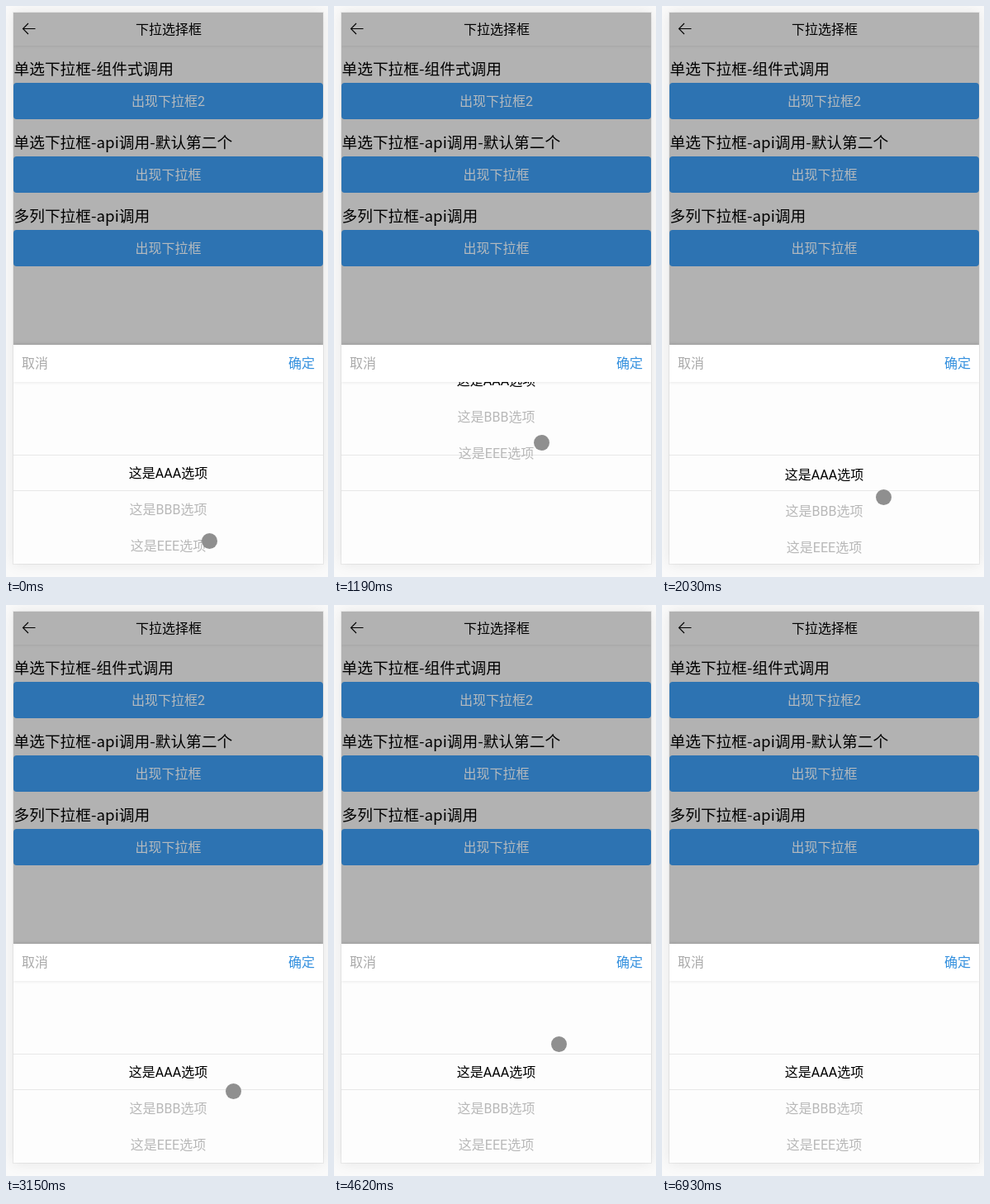
An HTML page that plays this animation: 390x691 px, repeating every 7.35 s.

```html
<!DOCTYPE html>
<html lang="zh-CN">
<head>
<meta charset="utf-8">
<title>下拉选择框</title>
<style>
html, body { margin: 0; width: 100%; height: 100%; overflow: hidden; }
body { position: relative; background: #fafafa; font: 16px Roboto, "Noto Sans CJK SC", "Noto Sans CJK", sans-serif; }
.stage { position: absolute; left: 0; top: 0; width: 390px; height: 691px; overflow: hidden; white-space: nowrap; }
.stage * { position: absolute; box-sizing: border-box; }
.phone { left: 9px; top: 8px; width: 375px; height: 667px; overflow: hidden; background: #b2b2b2;
  box-shadow: 0 0 0 1px rgba(0,0,0,.06), 0 0 16px rgba(0,0,0,.09); }
.bar { left: 0; top: 0; width: 375px; height: 40px; line-height: 42px; color: #000;
  box-shadow: 0 1px 3px rgba(0,0,0,.08); }
.bar svg { left: 10px; top: 12px; }
.bar span { left: 148px; }
h3 { left: .5px; margin: 0; color: #000;
  font: 400 18.72px/34px "Noto Sans CJK SC", "Noto Sans CJK", sans-serif; }
.btn { left: 0; width: 375px; height: 44px; line-height: 46px; border-radius: 4px;
  text-align: center; background: #2d73b2; color: #b5babe; }
.sheet { left: 0; top: 402px; width: 375px; height: 265px; background: #fff; box-shadow: 0 -1px 4px rgba(0,0,0,.13); }
.tools { left: 0; top: 0; width: 375px; height: 45px; line-height: 45px; z-index: 1; background: #fff;
  box-shadow: 0 1px 3px rgba(0,0,0,.08); }
.cancel { left: 10px; color: #aaa; }
.ok { right: 10px; color: #3490de; }
.wheel { left: 0; top: 45px; width: 375px; height: 220px; overflow: hidden; background: #fdfdfd; }
.mark { left: 0; top: 88px; width: 375px; height: 44px; border: solid #e8e8e8; border-width: 1px 0; }
.list { left: 0; top: 88px; width: 375px; }
.list div { position: static; height: 44px; line-height: 46px; text-align: center; color: #b8b8b8; }
.list .on { color: #000; }
#dot { left: 0; top: 0; width: 19px; height: 19px; border-radius: 50%; background: #8f8f8f; }
#arrow { left: 285px; top: 677px; visibility: hidden; animation: visit 7.35s step-end infinite; }
@keyframes visit { 83.8% { visibility: visible; } 94.28% { visibility: hidden; } }
</style>
</head>
<body>
<div class="stage">
  <div class="phone">
    <div class="bar">
      <svg width="18" height="16" fill="none" stroke="#000" stroke-width="1.1"><path d="M8 1L1.5 7.5L8 14M1.5 7.5H16.5"/></svg>
      <span>下拉选择框</span>
    </div>
    <h3 style="top:50px">单选下拉框-组件式调用</h3>
    <div class="btn" style="top:85px">出现下拉框2</div>
    <h3 style="top:139px">单选下拉框-api调用-默认第二个</h3>
    <div class="btn" style="top:174px">出现下拉框</div>
    <h3 style="top:228px">多列下拉框-api调用</h3>
    <div class="btn" style="top:263px">出现下拉框</div>
    <div class="sheet">
      <div class="tools"><span class="cancel">取消</span><span class="ok">确定</span></div>
      <div class="wheel">
        <div class="mark"></div>
        <div class="list" id="list">
          <div class="on">这是AAA选项</div>
          <div>这是BBB选项</div>
          <div>这是EEE选项</div>
        </div>
      </div>
    </div>
  </div>
  <div id="dot"></div>
  <svg id="arrow" width="13" height="20" fill="#fff" stroke="#000"><path d="M.5 .5V16.5L4.3 13L6.7 18.5L8.9 17.5L6.5 12H11.5Z"/></svg>
</div>
<script>
const LOOP = 7350, TICK = 70;
const PRESS = 770, RELEASE = 1890, LEAVE = 6160;
const GRAB = 640.5;      // pointer height at which the list rests
const OVERSHOOT = 31;    // list offset when let go
const build = 1.4, steady = 1, rush = 0.3; // easing powers

// Resting points of the pointer: start, ticks taken, x, y, easing
const rests = [
  [PRESS, 9, 253, 478.5, build],
  [1470, 6, 254.5, 671.5, rush],
  [1960, 5, 273.5, 570.5, rush],
  [2590, 5, 278.5, 609.5, steady],
  [3150, 3, 270.5, 545.5, steady],
  [3570, 3, 273.5, 567.5, steady],
  [3850, 3, 276.5, 513.5, rush],
  [4200, 2, 271.5, 569.5, steady],
  [4550, 2, 272.5, 531.5, steady],
  [4760, 3, 255.5, 579.5, steady],
  [5110, 2, 259.5, 571.5, steady],
  [5600, 5, 269.5, 603.5, build],
  [6020, 2, 282.5, 668.5, steady]
];
const dot = document.getElementById("dot");
const list = document.getElementById("list");

function pointer(t) {
  let x = 246.5, y = 647.5;
  for (const [from, ticks, endX, endY, power] of rests) {
    if (t < from) break;
    const k = Math.min(1, ((t - from) / TICK + 1) / ticks) ** power;
    x += (endX - x) * k;
    y += (endY - y) * k;
  }
  return [x, y];
}

function listShift(t, y) {
  if (t < PRESS) return 0;
  if (t < RELEASE) return y - GRAB;
  return OVERSHOOT * 0.25 ** ((t - RELEASE) / TICK);
}

function place(el, x, y) {
  el.style.transform = `translate(${Math.round(x)}px, ${Math.round(y)}px)`;
}

const start = performance.now();
function draw() {
  const t = Math.floor((performance.now() - start) % LOOP / TICK) * TICK;
  const [x, y] = pointer(t);
  dot.style.visibility = t < LEAVE ? "visible" : "hidden";
  place(dot, x - 9.5, y - 9.5);
  place(list, 0, listShift(t, y));
  requestAnimationFrame(draw);
}
draw();
</script>
</body>
</html>
```
